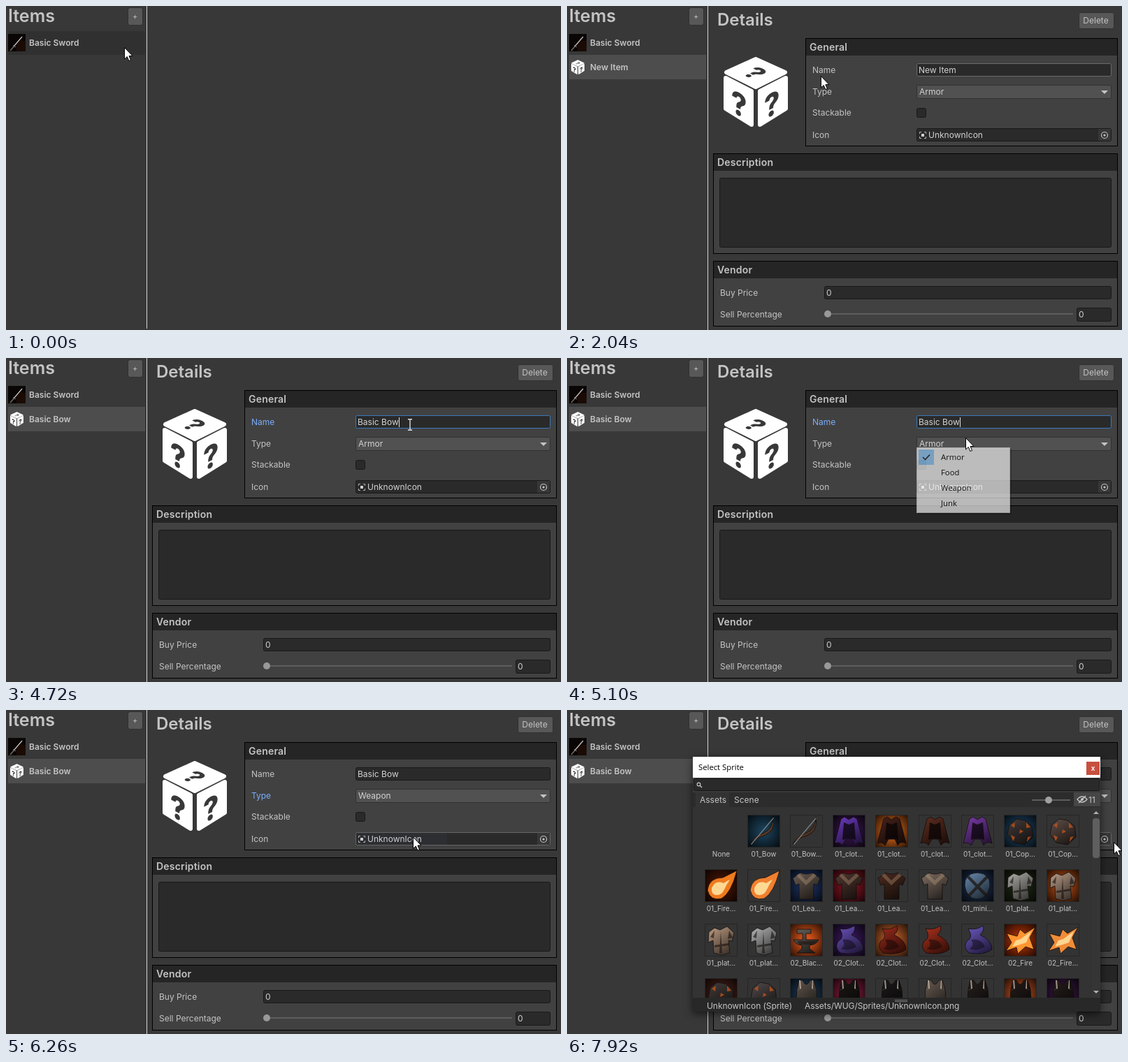
Animation, 794 px wide and 464 px high, one loop 8 s. Source, as an HTML page:

```html
<!DOCTYPE html>
<html lang="en">
<head>
<meta charset="utf-8">
<title>Item editor</title>
<style>
html, body { margin: 0; width: 100%; height: 100%; overflow: hidden; background: #383838; }
svg { display: block; width: 794px; height: 464px; }
text { font: 12px Inter, sans-serif; fill: #c4c4c4; white-space: pre; }
.title { font-size: 24px; font-weight: 600; }
.head { font-size: 14px; font-weight: 600; letter-spacing: .2px; }
.bold { font-weight: 600; }
.mid { text-anchor: middle; }
.value { fill: #d2d2d2; }
.small { font-size: 10px; text-anchor: middle; }
.foot { letter-spacing: -.07px; }
.system { font: 11.3px "Open Sans", "Noto Sans", sans-serif; fill: #000; }
.mark { font: 800 44px Inter, sans-serif; fill: #383838; text-anchor: middle; }
#picker { filter: drop-shadow(0 3px 6px rgba(0,0,0,.6)); }
</style>
</head>
<body>
<svg id="stage" viewBox="0 0 794 464"></svg>
<script>
const LOOP = 8000;
const $ = id => document.getElementById(id);
const rect = (x, y, w, h, fill, extra = '') =>
  `<rect x="${x}" y="${y}" width="${w}" height="${h}" fill="${fill}" ${extra}/>`;
const box = (x, y, w, h, fill, stroke, r = 0, extra = '') =>
  rect(x + .5, y + .5, w - 1, h - 1, fill, `stroke="${stroke}" rx="${r}" ${extra}`);
const text = (x, y, s, cls = '', extra = '') => `<text x="${x}" y="${y}" class="${cls}" ${extra}>${s}</text>`;
const path = (d, fill, extra = '') => `<path d="${d}" fill="${fill}" ${extra}/>`;
const line = (d, stroke, width = 1) => path(d, 'none', `stroke="${stroke}" stroke-width="${width}"`);
const circle = (x, y, r, fill, extra = '') => `<circle cx="${x}" cy="${y}" r="${r}" fill="${fill}" ${extra}/>`;
const group = (id, body, extra = '') => `<g id="${id}" ${extra}>${body}</g>`;
const panel = (x, y, w, h, name) =>
  rect(x, y, w, h, '#414141') + rect(x, y, w, 25, '#252525') +
  box(x, y, w, h, 'none', '#000') + text(x + 6, y + 18, name, 'head');
const field = (x, y, w, h, id = '') => box(x, y, w, h, '#2a2a2a', '#191919', 2, id && `id="${id}"`);

function dice() {
  const mark = (m, size) => `<text class="mark" y="${size * .36}" style="font-size:${size}px" transform="matrix(${m})">?</text>`;
  return path('M270 76 312 95 270 116 228 95ZM227 103 264 122V170L227 147ZM313 103 276 122V170L313 147Z',
    '#fff', 'stroke="#fff" stroke-width="6" stroke-linejoin="round"') +
    mark('.87 .45 0 1 246 141', 45) + mark('.87 -.45 0 1 293 141', 45) + mark('.87 .45 -.87 .45 269 96', 35);
}

function sidebar() {
  return rect(201, 0, 1, 462, '#d4d4d4', 'id="divider"') +
    text(3, 23, 'Items', 'title', 'style="font-size:25px"') +
    box(174, 2, 22, 26, '#585858', '#303030', 3, 'id="add"') + text(184.7, 19, '+', 'mid', 'style="font-size:11px"') +
    rect(3, 36, 196, 34, '#303030', 'id="row1"') + rect(3, 70, 196, 35, '#303030', 'id="row2"') +
    rect(3, 40, 25, 25, '#0a0605') + rect(15, 50, 13, 15, '#2c1006', 'opacity=".5"') +
    line('M6 64 12 57', '#6a625c', 1.8) + line('M11 58 23 44', '#c4c0ba', 1.3) + line('M10 56 14 59', '#80766c') +
    text(33, 57, 'Basic Sword', 'bold') +
    group('item', `<use href="#dice" transform="translate(15.5 87.5) scale(.205) translate(-270 -123)"/>` +
      text(33, 92, '', 'bold', 'id="itemName"'));
}

function details() {
  const label = (x, y, s, id = '') => text(x, y, s, '', id && `id="${id}"`);
  return text(215, 28, 'Details', 'title') +
    box(732, 9, 51, 24, '#585858', '#303030', 3) + text(756.5, 25, 'Delete', 'mid') +
    group('dice', dice()) +
    panel(341, 46, 447, 155, 'General') + panel(209, 211, 579, 144, 'Description') + panel(209, 365, 579, 94, 'Vendor') +
    label(351, 96, 'Name', 'nameLabel') + label(351, 127, 'Type', 'typeLabel') +
    label(351, 157, 'Stackable') + label(351, 189, 'Icon') +
    label(219, 415, 'Buy Price') + label(219, 446, 'Sell Percentage') +
    field(500, 82, 279, 19, 'nameField') + rect(503, 85, 54, 14, '#3a6cae', 'id="selection"') +
    text(503, 96, '', 'value', 'id="nameValue"') + rect(528, 85, 1, 14, '#e0e0e0', 'id="caret"') +
    box(500, 113, 279, 20, '#515151', '#303030', 2) + text(504, 127, 'Armor', 'value', 'id="typeValue"') +
    path('M764 121h10l-5 5Z', '#c4c4c4') +
    field(500, 146, 14, 14) +
    field(500, 175, 279, 19, 'iconField') + rect(760, 176, 18, 17, '#373737') +
    circle(769, 185, 4.5, 'none', 'stroke="#c4c4c4" stroke-width="1.2"') + circle(769, 185, 1.6, '#c4c4c4') +
    line('M504.500 183v-2.500h2.500M511 180.500h2.500v2.500M513.500 187v2.500h-2.500M507 189.500h-2.500v-2.500', '#b0b0b0') +
    rect(507, 183, 4, 4, '#d0d0d0') + text(517, 189, 'UnknownIcon', 'value') +
    field(218, 246, 561, 100) + field(368, 401, 411, 19) + text(371, 415, '0', 'value') +
    rect(373, 440, 351, 2, '#5e5e5e') + circle(373, 441, 5, '#999') +
    field(729, 432, 50, 20) + text(732, 446, '0', 'value');
}

const TYPES = ['Armor', 'Food', 'Weapon', 'Junk'];
function menu() {
  return rect(502, 130, 134, 94, '#000', 'opacity=".3"') +
    box(500, 128, 134, 94, '#f0f0f0', '#ccc') +
    rect(503, 131, 128, 22, '#91c9f7', 'id="menuHover"') + rect(503, 131, 22, 22, '#90c8f6') +
    line('M509 142l3.500 3.500 6.500-7', '#111', 1.4) +
    TYPES.map((s, i) => text(535, 146 + 22 * i, s, 'system')).join('');
}

// Each shape: body outline, inner part, and optionally the inner part's colour and opacity.
const SHAPES = {
  bow: ['M37 3Q37 21 23 26 10 31 4 42 11 33 24 30 41 24 37 3Z', 'M37 4 38 5 6 43 5 42Z', '#ccc', .5],
  cloak: ['M12 6 17 3 23 7 30 3 35 6 44 41Q36 37 32 44 30 38 28 35H19Q16 40 14 44 10 38 3 41Z', 'M16 11 23 14 31 11 33 36Q24 32 14 36Z', '#080406', .75],
  ore: ['M8 14 18 6 30 8 40 16 42 32 30 43 14 40 5 28Z', 'M10 15 16 11 15 19ZM32 11 38 18 32 19ZM34 32 39 31 33 39ZM10 29 16 32 13 38ZM23 21 28 24 22 27Z', '#b8501c', .85],
  fire: ['M46 2Q34 8 26 12 6 12 4 30 8 46 24 42 38 34 46 2Z', 'M10 27Q15 15 27 20 33 16 36 15 31 22 28 29 24 38 16 37 9 36 10 27Z', '#ffe2a0', .9],
  shirt: ['M15 5Q23 9 32 5L43 13 39 23 34 21V43H13V21L8 23 4 13Z', 'M13 6 23 16 34 6 38 9 23 23 9 9Z', '#d8b48c', .3],
  shield: ['M23 5Q42 6 41 24 38 42 23 43 8 42 5 24 4 6 23 5Z', 'M11 9 39 38 36 41 8 12ZM36 9 39 12 11 41 8 38Z', '#1c1410', .75],
  plate: ['M14 6 22 9 32 4 42 13 39 25 34 24 36 42 24 45 13 42 12 24 5 27 6 12Z', 'M14 10 8 19 13 21ZM35 10 40 20 33 22ZM23 11 25 43 21 42ZM14 31 34 28V31L14 34Z', '#14100e', .6],
  anvil: ['M10 8H30V14H23V23H41Q38 30 28 31V36L36 42H10L17 36V31Q8 30 5 23H18V14H10Z', 'M10 25H39L31 30H14Z', '#1a0c06', .5],
  cloth: ['M10 7Q20 10 31 3 34 9 27 16 44 24 44 37 32 46 11 42 2 34 8 25 18 20 10 7Z', 'M14 23Q28 20 34 33 22 40 12 36 20 31 14 23Z', '#080406', .45],
  flame: ['M45 5 37 20 43 37 31 33 20 43 18 34 3 39 11 27 4 14 19 18 23 8 30 14Z', 'M39 11 32 27 23 30 12 33 17 24 24 22Z', '#ffe2a0', .85],
  tank: ['M13 3H18Q23 15 29 3H34L38 16 40 47H8L10 16Z', 'M13 3 14 15 10 18 12 16 16 15 15 3ZM33 3 33 15 38 18 35 16 31 15 32 3Z', '#d8c8b8', .7]
};
const BARE = 'none';
const TILES = [
  `None|01_Bow bow #1b4058 #8a5a3c|01_Bow... bow ${BARE} #80543a|01_clot... cloak #3a1650 #6034a8|01_clot... cloak #e06a1c #3e1e16|` +
  `01_clot... cloak ${BARE} #54281c|01_clot... cloak ${BARE} #6c3496|01_Cop... ore #1d4668 #3a3432|01_Cop... ore ${BARE} #54443e`,
  `01_Fire... fire #4a1606 #f07a1c|01_Fire... fire ${BARE} #f08030|01_Lea... shirt #1c3468 #5c5048|01_Lea... shirt #8a1424 #46302a|` +
  `01_Lea... shirt ${BARE} #42261c|01_Lea... shirt ${BARE} #6e6056|01_mini... shield #1c3050 #5a7898|01_plat... plate #202a16 #9a9a94|01_plat... plate #b84c14 #a48a78`,
  `01_plat... plate ${BARE} #a88a74|01_plat... plate ${BARE} #a0a0a0|02_Blac... anvil #e8581a #595450|02_Clot... cloth #3c1a60 #5f48a8|` +
  `02_Clot... cloth #c8642c #8c2618|02_Clot... cloth ${BARE} #9c2c1a|02_Clot... cloth ${BARE} #624eae|02_Fire flame #b83408 #ff9430|02_Fire... flame ${BARE} #f08c38`,
  `- ore #4a2018 #3a3432|- ore ${BARE} #484040|- tank #1c3c5c #544a42|- tank #8a1c40 #181414|- tank ${BARE} #181616|- tank ${BARE} #5c5048|` +
  `- tank ${BARE} #201c1a|- tank #c05020 #201816|- tank #3c1848 #201a18`
];
function tile(spec, col, row) {
  const [name, kind, back, fill] = spec.split(' ');
  const x = Math.round(197 + 61.1 * col), y = 150 + 78 * row;
  const label = text(x + 23.500, y + 60, name, 'small');
  if (!kind) return label;
  const [body, inner, innerFill, opacity] = SHAPES[kind];
  const glowing = kind === 'fire' || kind === 'flame';
  const art = (back === BARE ? '' : rect(0, 0, 47, 47, back) + rect(0, 0, 47, 47, 'url(#vignette)')) +
    path(body, fill, 'stroke="#140e0c" stroke-width=".8"') +
    (glowing ? '' : path(body, 'url(#shade)')) +
    path(inner, innerFill, `opacity="${opacity}"`);
  return `<g transform="translate(${x} ${y})">${art}${box(0, 0, 47, 47, 'none', '#262626')}</g>` + label;
}

function picker() {
  const tiles = TILES.map((row, r) => row.split('|').map((s, c) => tile(s, c, r)).join('')).join('');
  return rect(180, 67, 583, 365, '#333') + rect(180, 67, 583, 30, '#fff') + text(188, 86, 'Select Sprite', 'system') +
    rect(743, 74, 19, 19, '#c8503f') + text(752.5, 87, 'x', 'mid', 'style="font-size:10px;font-weight:600;fill:#fff"') +
    rect(180, 97, 583, 21, '#3a3a3a') + field(181, 98, 581, 18) +
    circle(188.5, 106.500, 2.300, 'none', 'stroke="#c4c4c4" stroke-width="1.200"') + line('M190 108l3 3', '#c4c4c4', 1.4) +
    rect(180, 118, 583, 21, '#2c2c2c') + rect(184, 118, 48, 21, '#333') +
    text(190, 133, 'Assets') + text(239, 133, 'Scene') +
    rect(665, 128, 55, 2, '#5e5e5e') + circle(689, 129, 5, '#a0a0a0') +
    rect(725, 118, 38, 20, '#464646') +
    line('M730 128q7-8 14 0q-7 8-14 0ZM732 133l10-10', '#c4c4c4', 1.4) + circle(737, 128, 2, '#c4c4c4') + text(746, 133, '11') +
    `<g clip-path="url(#grid)">${tiles}</g>` +
    rect(751, 139, 12, 273, '#353535') + rect(752, 155, 10, 57, '#5f5f5f', 'rx="4"') +
    path('M753 149h8l-4-4ZM753 402h8l-4 4Z', '#b0b0b0') +
    rect(180, 412, 583, 20, '#282828') + line('M469 415.500h18M469 417.500h18', '#777') +
    text(200, 428, 'UnknownIcon (Sprite)', 'foot') + text(340, 428, 'Assets/WUG/Sprites/UnknownIcon.png', 'foot');
}

$('stage').innerHTML =
  `<defs><radialGradient id="vignette" r=".7"><stop offset=".2" stop-opacity=".1"/><stop offset="1" stop-opacity=".85"/></radialGradient>
  <linearGradient id="shade" x2=".6" y2="1"><stop offset=".2" stop-opacity="0"/><stop offset="1" stop-opacity=".6"/></linearGradient>
  <clipPath id="grid">${rect(180, 139, 571, 273, '#000')}</clipPath></defs>` +
  rect(0, 0, 794, 464, '#383838') + sidebar() + group('details', details()) +
  rect(503, 176, 128, 17, '#7f9cff', 'id="ghost" opacity=".04"') + group('menu', menu()) + group('picker', picker()) +
  group('arrow', path('M0 0V16.500L3.800 13 6.400 19 9 18 6.500 12H11.500Z', '#fff', 'stroke="#000" stroke-width="1"')) +
  group('beam', line('M-3 -7.500H-.8L0 -6.800.8 -7.500H3M0 -7V7.500M-3 8H-.8L0 7.300.8 8H3', '#e8e8e8', 1.300));

const smooth = u => u * u * (3 - 2 * u);
const easeOut = u => 1 - (1 - u) ** 2;
const linear = u => u;
const clamp = v => Math.max(0, Math.min(1, v));

// time, x, y, easing used to arrive there
const CURSOR = [
  [0, 169.5, 59.5], [300, 181, 21.500, smooth], [1150, 181, 21.500], [1490, 147.500, 85.500, smooth],
  [1870, 147.500, 85.500], [2040, 362.500, 100.500, linear], [2530, 577.500, 93.500, easeOut], [3350, 577.500, 93.500],
  [3450, 578.500, 94, linear], [4700, 578.500, 94], [4840, 570.500, 114.500, smooth], [5370, 570.500, 114.500],
  [5820, 582.500, 182, smooth], [6930, 582.500, 182], [7490, 773, 184, smooth], [7919, 773, 184], [7920, 782.500, 189.500]
];
function cursorAt(t) {
  const i = CURSOR.findIndex(k => k[0] > t);
  if (i < 0) return CURSOR[CURSOR.length - 1].slice(1, 3);
  const [t0, x0, y0] = CURSOR[i - 1], [t1, x1, y1, ease = linear] = CURSOR[i];
  const u = ease((t - t0) / (t1 - t0));
  return [x0 + (x1 - x0) * u, y0 + (y1 - y0) * u];
}

const KEYS = [3060, 3230, 3360, 3530, 3630, 3730, 3830, 3960, 4060];
const show = (id, on) => $(id).setAttribute('visibility', on ? 'visible' : 'hidden');
const set = (id, name, value) => $(id).setAttribute(name, value);
const put = (id, s) => { if ($(id).textContent !== s) $(id).textContent = s; };

function draw(t) {
  const [x, y] = cursorAt(t);
  const opened = t >= 1660, nameFocus = t >= 2500 && t < 6020, chosen = t >= 6020;
  const inList = x < 199;

  set('add', 'fill', t >= 700 && t < 830 ? '#46607c' : '#585858');
  set('divider', 'height', opened ? 464 : 462);
  show('item', t >= 770);
  show('row1', inList && y >= 36 && y < 70);
  show('row2', opened || (t >= 770 && inList && y >= 70));
  set('row2', 'fill', !opened ? '#303030' : inList ? '#2c5d87' : '#4d4d4d');

  const typed = KEYS.filter(k => k <= t).length;
  const name = typed ? 'Basic Bow'.slice(0, typed) : 'New Item';
  put('itemName', name);
  put('nameValue', name);
  put('typeValue', chosen ? 'Weapon' : 'Armor');

  $('details').style.display = opened ? '' : 'none';
  show('selection', nameFocus && !typed);
  show('caret', nameFocus && typed);
  if (opened) set('caret', 'x', Math.round(503.500 + $('nameValue').getComputedTextLength()));
  $('nameLabel').style.fill = nameFocus ? '#7baefa' : '';
  $('typeLabel').style.fill = chosen ? '#7baefa' : '';
  const overName = x > 345 && y > 80 && y < 103;
  set('nameField', 'stroke', nameFocus ? '#3a79bb' : overName ? '#6a6a6a' : '#191919');
  set('iconField', 'stroke', chosen && y > 172 ? '#656565' : '#191919');

  const fade = chosen ? 1 - (t - 6020) / 240 : (t - 5010) / 130;
  const hover = Math.floor((y - 131) / 22);
  $('menu').style.display = t >= 5040 && t < 6260 ? '' : 'none';
  set('menu', 'opacity', clamp(fade));
  show('menuHover', hover >= 0);
  set('menuHover', 'y', 131 + 22 * Math.max(0, hover));
  show('ghost', t >= 6260);
  $('picker').style.display = t >= 7920 ? '' : 'none';

  const beam = opened && x > 500 && y > 82 && y < 101;
  show('beam', beam);
  show('arrow', !beam);
  set(beam ? 'beam' : 'arrow', 'transform', `translate(${x} ${y})`);
}

const start = performance.now();
function tick() {
  draw((performance.now() - start) % LOOP);
  requestAnimationFrame(tick);
}
tick();
</script>
</body>
</html>
```
